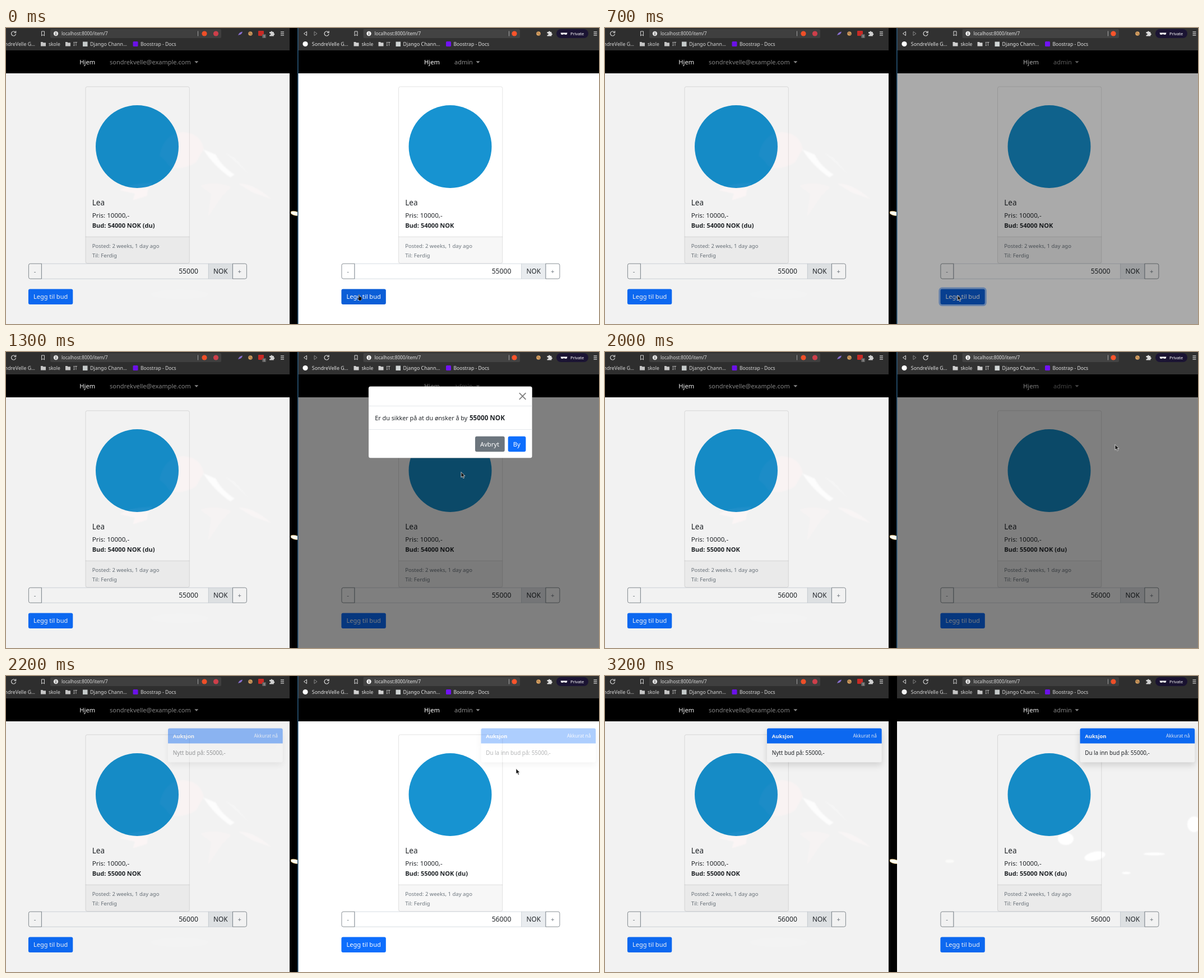
An HTML page that plays this animation: 1058 px wide and 529 px high, repeating every 3.9 s.

```html
<!DOCTYPE html>
<html lang="no">
<head>
<meta charset="utf-8">
<title>Auksjon</title>
<style>
  html, body { margin: 0; height: 100%; overflow: hidden; background: #000; }
  svg { display: block; }
  text { font-family: "Noto Sans", sans-serif; white-space: pre; }
  .bold { font-weight: 700; }
  .toast { filter: drop-shadow(0 5.8px 5.8px rgba(0, 0, 0, .15)); }
</style>
</head>
<body>
<svg id="stage" width="1058" height="529" viewBox="0 0 1058 529"></svg>
<script>
const LOOP = 3900, STEP = 100;
const BLUE = '#0d6efd', DARK_BLUE = '#0b5ed7', GREY = '#6c757d', INK = '#212529';

const rect = (x, y, w, h, fill, extra = '') =>
  `<rect x="${x}" y="${y}" width="${w}" height="${h}" fill="${fill}" ${extra}/>`;
const dot = (x, y, r, fill) => `<circle cx="${x}" cy="${y}" r="${r}" fill="${fill}"/>`;
const blob = (x, y, rx, ry, fill, extra = '') =>
  `<ellipse cx="${x}" cy="${y}" rx="${rx}" ry="${ry}" fill="${fill}" ${extra}/>`;
const path = (d, fill, stroke = 'none', width = 1, extra = '') =>
  `<path d="${d}" fill="${fill}" stroke="${stroke}" stroke-width="${width}" ${extra}/>`;
const text = (x, y, size, str, fill = INK, extra = '') =>
  `<text x="${x}" y="${y}" font-size="${size}" fill="${fill}" ${extra}>${str}</text>`;

// Bright spots behind the windows; they only shine through faintly.
const wallpaper = () => `<g filter="url(#soft)">` +
  path('M275 228Q282 190 315 187Q346 188 352 216L338 240Q310 256 292 246L284 236Z', '#f44', '#f44', 2, 'opacity=".5"') +
  path('M352 217L374 226Q384 246 408 262L400 267Q370 246 352 217', '#fff', 'none', 1, 'opacity=".8"') +
  path('M390 222L408 232L436 264L410 240Z', '#fff', 'none', 1, 'opacity=".3"') +
  path('M203 290Q225 276 262 277Q250 290 252 300L226 308L230 296Z', '#f66', 'none', 1, 'opacity=".7"') +
  path('M346 282Q372 272 402 284L386 300L360 338L366 296Z', '#f66', 'none', 1, 'opacity=".35"') +
  path('M414 278Q440 276 474 306L440 294Z', '#f88', 'none', 1, 'opacity=".5"') +
  blob(310, 476, 52, 9, '#9cc', 'opacity=".15"') +
  blob(822, 291, 14, 11, '#fff') +
  blob(874, 322, 19, 8, '#fff', 'transform="rotate(-12 874 322)"') +
  blob(1051, 265, 12, 14, '#fff') + blob(980, 318, 19, 2.5, '#fff') +
  blob(930, 352, 8, 2, '#fff') + blob(615, 331, 8, 3, '#ffd', 'opacity=".7"') +
  `</g>` + path('M508 328.5Q512 325.5 522 329.5V335.5Q513 336 508.3 331.5Z', '#fffdf0', '#c8a050', .7);

const folder = x => path(`M${x} 25h3.5l1 1.2h4.5v6.3h-9z`, '#d0d0d0');
const menu = x => [7, 10, 13].map(y => rect(x - 3, y - .6, 6, 1.2, '#ddd')).join('');
const puzzle = x => path(`M${x - 4} 7h2.4a1.5 1.5 0 1 1 3 0h2.4v2.5a1.5 1.5 0 1 1 0 3v2h-7.8v-2.2a1.5 1.5 0 1 0 0-2.6z`, '#ddd');
const cookie = x => dot(x, 10, 3.8, '#d8a263') + dot(x - 1, 9, .8, '#704522') + dot(x + 1.4, 11, .8, '#704522');

const browserBar = fieldWidth =>
  rect(-40, 0, 560, 40.5, '#313131') +
  path('M16.4 7.2A4 4 0 1 0 17.5 10.5M17.6 5.2v3.2h-3.2', 'none', '#ddd', 1.2) +
  path('M63.5 6h5v8l-2.5-2-2.5 2z', 'none', '#ddd') +
  rect(79, 2, fieldWidth, 16, '#434343', 'rx="2"') +
  dot(89, 10, 4.2, '#eee') + rect(88.5, 7.4, 1, 1.2, '#333') + rect(88.5, 9.3, 1, 3.4, '#333') +
  text(99, 13, 8.1, 'localhost:8000/item/7', '#e4e4e4') +
  text(52, 32, 8.8, 'SondreVelle G…', '#e4e4e4', 'text-anchor="end"') +
  folder(62) + text(76, 32, 8.5, 'skole', '#e4e4e4') +
  folder(106) + text(120, 32, 8, 'IT', '#e4e4e4') +
  rect(137, 24.5, 8.5, 8.5, '#cfd4d4') + text(150, 32, 8.8, 'Django Chann…', '#e4e4e4') +
  rect(226.5, 24, 9, 9, '#7112f5', 'rx="1.5"') + text(240, 32, 8.6, 'Boostrap - Docs', '#e4e4e4');

const leftTools = () =>
  rect(342, 5.5, 1, 9, '#aaa') + dot(354, 10, 4.6, '#fb542b') + dot(374.5, 10, 4.6, '#d8434f') +
  path('M414 13.5Q416 7 422 6.5Q421 12 415 12.5', '#8f75d8') + cookie(436) +
  rect(450, 5, 10, 9, '#d32d27', 'rx="1"') +
  rect(457, 11, 7, 7, '#666', 'rx="1.5"') + text(459, 17, 6, '1', '#fff') + puzzle(474) + menu(493);

const rightTools = () =>
  path('M-27 10l5-3.6v7.2z', 'none', '#ddd') + path('M-3.5 10l-5-3.6v7.2z', 'none', '#888') +
  dot(-24.5, 28.5, 4.6, '#fff') +
  rect(338.5, 5.5, 1, 9, '#aaa') + dot(348.5, 10, 4.6, '#fb542b') + cookie(391.5) + puzzle(411) +
  rect(423.5, 2, 57, 16, '#1b1433', 'rx="8"') +
  path('M431 8.5h12l-1 3.2h-4l-1-1.8-1 1.8h-4z', '#fff') +
  text(448.5, 12.8, 7.4, 'Private', '#fff') + menu(493);

const navbar = (homeX, userX, user, caretX) =>
  rect(-40, 40, 560, 41, '#000') + text(homeX, 65.3, 11.2, 'Hjem', '#fff') +
  text(userX, 65.3, 11, user, '#8c8c8c') + path(`M${caretX} 59.2h7l-3.5 3.7z`, '#8c8c8c');

const page = side =>
  rect(142, 104.9, 185.3, 315.6, 'none', 'rx="3" stroke="#000" stroke-opacity=".14" stroke-width=".8"') +
  dot(234, 212, 74, '#1793d1') +
  text(153.7, 317, 13.5, 'Lea') + text(153.7, 339.3, 11.6, 'Pris: 10000,-') +
  text(153.7, 356.8, 11.05, '', INK, `id="${side}Bid" class="bold"`) +
  rect(142, 373, 185.3, 47.3, '#000', 'opacity=".03"') + rect(142, 372.7, 185.3, .8, '#000', 'opacity=".14"') +
  text(153.7, 392.7, 9.5, 'Posted: 2 weeks, 1 day ago', GREY) + text(153.7, 410.4, 9.7, 'Til: Ferdig', GREY) +
  rect(63.3, 421.2, 298, 27, '#fff', 'stroke="#ced4da" stroke-width=".8"') +
  rect(361.3, 421.2, 43, 27, '#e9ecef', 'stroke="#ced4da" stroke-width=".8"') +
  path('M63.4 421.2h-20a3 3 0 0 0-3 3v21a3 3 0 0 0 3 3h20z', 'none', GREY, .8) +
  path('M404.4 421.2h22a3 3 0 0 1 3 3v21a3 3 0 0 1-3 3h-22z', 'none', GREY, .8) +
  text(49.8, 438.8, 11.2, '-', GREY) + text(413.4, 438.8, 11.2, '+', GREY) +
  text(343, 439.2, 12.2, '', INK, `id="${side}Amount" text-anchor="end"`) +
  text(370, 439.2, 11.8, 'NOK') +
  rect(38.4, 464.9, 82.4, 30.6, 'none', `id="${side}Ring" rx="4.4" stroke="#3184fd" stroke-opacity=".5" stroke-width="3" opacity="0"`) +
  rect(39.9, 466.4, 79.4, 27.6, BLUE, `id="${side}Button" rx="3"`) + text(49, 484.4, 11, 'Legg til bud', '#fff');

const toast = (side, message) => `<g id="${side}Toast" class="toast" opacity="0">` +
  rect(289, 93.5, 204.7, 60.7, '#fff', 'rx="3" fill-opacity=".95"') +
  path('M289 120.5v-24a3 3 0 0 1 3-3h198.7a3 3 0 0 1 3 3v24z', BLUE) +
  text(297.7, 110.5, 9.5, 'Auksjon', '#fff', 'class="bold"') +
  text(485, 110.4, 8.4, 'Akkurat nå', '#e7f0ff', 'text-anchor="end"') +
  text(297.7, 141.2, 9.9, message) + '</g>';

const modal = () => '<g id="modal" opacity="0">' +
  rect(646.8, 61.4, 292, 128.2, '#fff', 'rx="3.5" stroke="#000" stroke-opacity=".2" stroke-width=".8"') +
  rect(647, 96.2, 291.6, .8, '#dee2e6') + rect(647, 138, 291.6, .8, '#dee2e6') +
  path('M916.3 73.7l10.6 10.6m0-10.6l-10.6 10.6', 'none', '#7c7c7c', 1.7, 'stroke-linecap="round"') +
  text(658.3, 122.2, 10.8, 'Er du sikker på at du ønsker å by') +
  text(826.9, 122.2, 11.7, '55000 NOK', INK, 'class="bold"') +
  rect(837, 150.8, 52.7, 27.5, GREY, 'rx="3"') + text(846, 169, 11.2, 'Avbryt', '#fff') +
  rect(895.7, 150.8, 31.7, 27.5, BLUE, 'id="confirm" rx="3" stroke="#3184fd" stroke-opacity=".5" stroke-width="0" paint-order="stroke"') +
  text(904.7, 169, 11.2, 'By', '#fff') + '</g>';

const cursor = () => '<g id="cursor">' +
  path('M0 0v9.6l2.2-2 1.6 3.6 1.7-.8-1.6-3.4h3z', '#111', '#fff', .7, 'id="arrow"') +
  path('M.2-1.2l1.4.3.6 3.5 3.4 1v3.4l-1.2 2.6h-3.2l-3.6-4 1.1-.8 1.4 1z', '#111', '#eee', .4, 'id="hand"') + '</g>';

document.getElementById('stage').innerHTML =
  '<filter id="soft"><feGaussianBlur stdDeviation="1.2"/></filter>' + wallpaper() +
  '<svg width="506" height="529" viewBox="0 0 506 529"><g opacity=".95">' +
    rect(0, 0, 506, 529, '#fff') + browserBar(305) + leftTools() +
    navbar(131.3, 185, 'sondrekvelle@example.com', 336.3) + page('left') +
    toast('left', 'Nytt bud på: 55000,-') + '</g></svg>' +
  '<svg x="521" width="537" height="529" viewBox="-37.5 0 537 529"><g id="rightWindow">' +
    rect(-40, 0, 560, 529, '#fff') + browserBar(279.5) + rightTools() +
    navbar(187.5, 241.5, 'admin', 280) + page('right') +
    toast('right', 'Du la inn bud på: 55000,-') +
    rect(-40, 40, 560, 489, '#000', 'id="backdrop"') + '</g></svg>' +
  rect(520, 0, 1.6, 529, '#285577', 'id="border"') + modal() + cursor();

const parts = Object.fromEntries([...document.querySelectorAll('[id]')].map(el => [el.id, el]));
const set = (id, name, value) => parts[id].setAttribute(name, value);
const ramp = (t, start, length) => Math.min(1, Math.max(0, (t - start) / length));

// CSS ease-out, cubic-bezier(0, 0, .58, 1)
function easeOut(x) {
  let low = 0, high = 1;
  for (let i = 0; i < 20; i++) {
    const s = (low + high) / 2;
    if (1.74 * s * s - .74 * s ** 3 < x) low = s; else high = s;
  }
  return 3 * low * low - 2 * low ** 3;
}

const CURSOR_PATH = [[1100, 629, 477.5], [1200, 715, 350], [1300, 812, 214.5], [1400, 888, 180], [1500, 910, 165.5]];
function cursorAt(t) {
  const next = CURSOR_PATH.findIndex(p => p[0] > t);
  if (next < 0) return CURSOR_PATH.at(-1).slice(1);
  if (next === 0) return CURSOR_PATH[0].slice(1);
  const [a, b] = [CURSOR_PATH[next - 1], CURSOR_PATH[next]], k = (t - a[0]) / (b[0] - a[0]);
  return [a[1] + (b[1] - a[1]) * k, a[2] + (b[2] - a[2]) * k];
}

function draw(t) {
  const unfocus = ramp(t, 2800, 400);
  set('rightWindow', 'opacity', 1 - .05 * unfocus);
  set('border', 'opacity', 1 - unfocus);

  set('backdrop', 'opacity', .5 * (ramp(t, 600, 150) - ramp(t, 2045, 150)));
  const lift = 1 - easeOut(ramp(t, 745, 300)) + easeOut(ramp(t, 1770, 300));
  set('modal', 'opacity', ramp(t, 745, 172) - ramp(t, 1770, 120));
  set('modal', 'transform', `translate(0 ${-36.5 * lift})`);
  const overConfirm = t >= 1500 && t < 1900;
  set('confirm', 'fill', overConfirm ? DARK_BLUE : BLUE);
  set('confirm', 'stroke-width', t >= 1700 ? 5.8 : 0);

  const refocus = ramp(t, 2200, 200) * (1 - unfocus);
  set('rightRing', 'opacity', t >= 500 && t < 1100 ? 1 : refocus);
  set('rightButton', 'fill', t < 1100 || refocus > 0 ? DARK_BLUE : BLUE);

  const sold = t >= 1900;
  parts.leftBid.textContent = sold ? 'Bud: 55000 NOK' : 'Bud: 54000 NOK (du)';
  parts.rightBid.textContent = sold ? 'Bud: 55000 NOK (du)' : 'Bud: 54000 NOK';
  parts.leftAmount.textContent = parts.rightAmount.textContent = sold ? '56000' : '55000';
  set('leftToast', 'opacity', ramp(t, 2133, 150));
  set('rightToast', 'opacity', ramp(t, 2150, 150));

  const pointing = t < 600 || overConfirm;
  set('cursor', 'transform', `translate(${cursorAt(t)})`);
  set('cursor', 'opacity', t < 2900 ? 1 : 0);
  set('hand', 'opacity', pointing ? 1 : 0);
  set('arrow', 'opacity', pointing ? 0 : 1);
}

function tick() {
  draw(Math.floor(performance.now() % LOOP / STEP) * STEP);
  requestAnimationFrame(tick);
}
tick();
</script>
</body>
</html>
```
